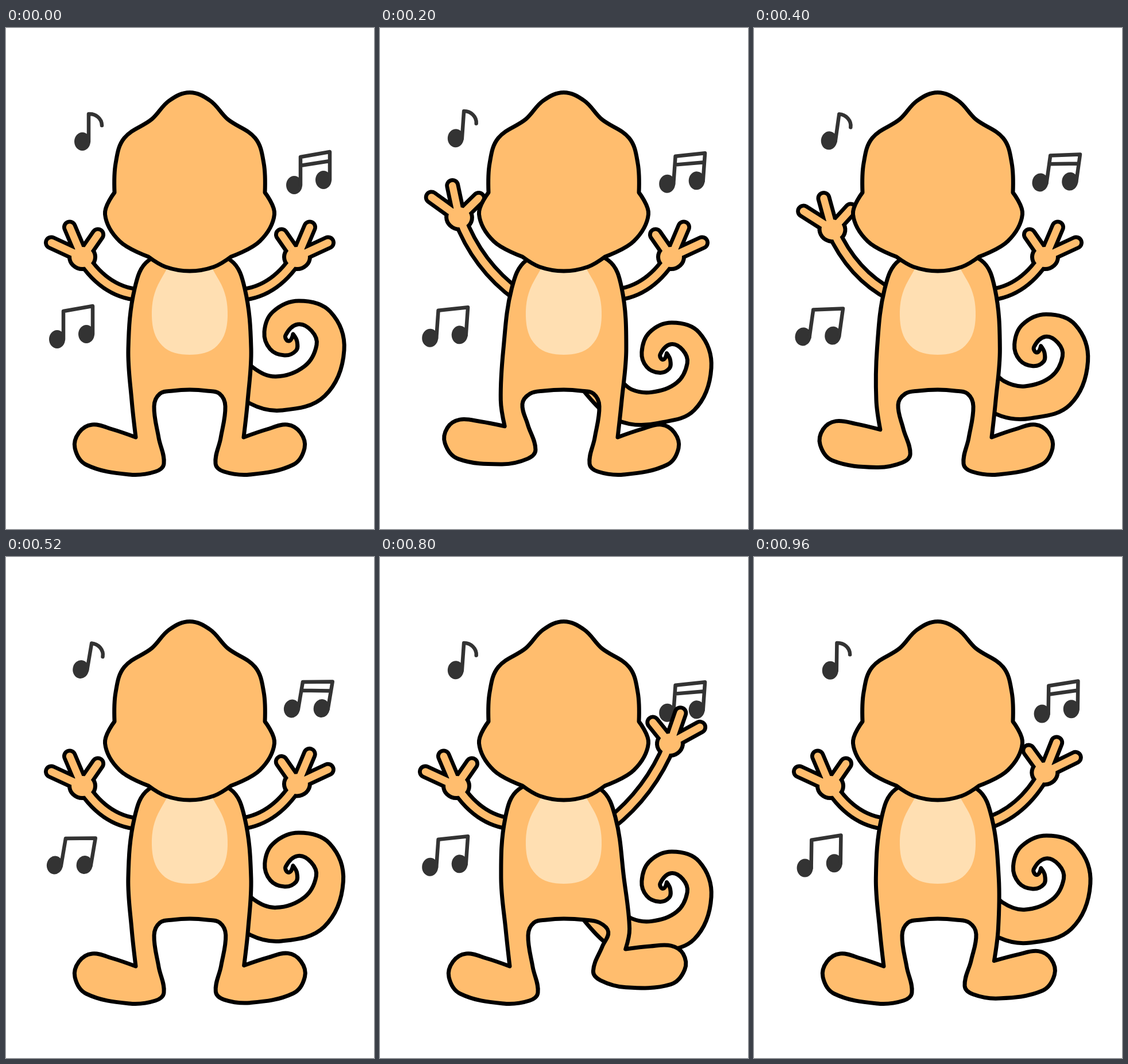
An HTML page with a canvas for the animation above (1 s loop, 641 by 874 pixels).

```html
<!DOCTYPE html>
<html lang="en">
<head>
<meta charset="utf-8">
<title>Dancing lizard</title>
<style>
html, body { margin: 0; width: 100%; height: 100%; overflow: hidden; background: #fff; }
canvas { display: block; }
</style>
</head>
<body>
<canvas id="stage" width="641" height="874"></canvas>
<script>
const ctx = document.getElementById('stage').getContext('2d');
const SKIN = '#ffbd6e', BELLY = '#ffdfb2', INK = '#000', NOTE = '#333';
const MID = 320, CORNER = true;

// Key points of the right halves; the left halves are mirrored
const head = [
  [MID, 112.5], [356, 127], [386, 159], [434, 192], [449, 236], [451, 287, CORNER],
  [467.5, 325], [442, 372], [392, 399, CORNER], [362, 416.7], [MID, 424]
];
const belly = [[MID, 390], [371, 440], [386, 503], [368, 554], [MID, 570]];
const body = [
  [MID, 385], [391, 405], [416, 455], [427, 560], [421, 650], [414, 714, CORNER],
  [455, 700], [490, 692], [513, 706], [520, 733], [500, 762], [425, 779], [380, 774],
  [365, 760], [374, 715], [382, 660], [372, 638], [350, 633], [MID, 631]
];
const tail = [
  [320, 530, CORNER], [375, 612], [425, 655], [480, 667], [555, 642], [589, 562],
  [565, 495], [510, 476], [465, 495], [450, 530], [460, 560], [485, 571], [505, 563],
  [507, 547], [500, 534, CORNER], [493, 546], [487, 536], [508, 517], [532, 528],
  [541, 553], [520, 590], [470, 608], [430, 592], [405, 560, CORNER]
];
const fingers = [[54, -25], [22, -52], [-27, -39]];

const clamp = v => Math.min(1, Math.max(0, v));
const ease = (v, from, to) => { const u = clamp((v - from) / (to - from)); return u * u * (3 - 2 * u); };
const rad = deg => deg * Math.PI / 180;
const flip = ([x, y, corner]) => [2 * MID - x, y, corner];
const join = (right, left) => right.concat(left.map(flip).reverse().slice(1, -1));

// Closed smooth curve: handles run parallel to the neighbours' chord
function trace(pts) {
  const n = pts.length, at = i => pts[(i + n) % n];
  const handle = (i, len) => {
    const [x, y, corner] = at(i), a = at(i - 1), b = at(i + 1);
    const dx = b[0] - a[0], dy = b[1] - a[1], s = corner ? 0 : len / Math.hypot(dx, dy);
    return [x + dx * s, y + dy * s];
  };
  ctx.beginPath();
  ctx.moveTo(pts[0][0], pts[0][1]);
  for (let i = 0; i < n; i++) {
    const p = at(i), q = at(i + 1), len = .36 * Math.hypot(q[0] - p[0], q[1] - p[1]);
    ctx.bezierCurveTo(...handle(i, len), ...handle(i + 1, -len), q[0], q[1]);
  }
  ctx.closePath();
}

function shape(pts) {
  trace(pts);
  ctx.fillStyle = SKIN;
  ctx.fill();
  ctx.strokeStyle = INK;
  ctx.lineWidth = 7;
  ctx.stroke();
}

// The tail sinks and narrows, its root most of all
function drawTail(k) {
  shape(tail.map(([x, y, corner]) => [
    x - .135 * (x - 496) * k,
    y + (40 - .085 * (y - 476) + .42 * Math.max(0, 455 - x)) * k,
    corner
  ]));
}

function drawArm(k, shift, rise, turn) {
  const x = 507 + shift * k, y = 399.5 - rise * k;
  for (const [color, line, grow] of [[INK, 26, 7], [SKIN, 12.5, 0]]) {
    ctx.strokeStyle = ctx.fillStyle = color;
    ctx.lineWidth = line;
    ctx.beginPath();
    ctx.moveTo(x, y);
    ctx.quadraticCurveTo(465 + 6 * k, 465 - 55 * k, 400, 466);
    ctx.stroke();
    ctx.save();
    ctx.translate(x, y);
    ctx.rotate(rad(turn * k));
    ctx.beginPath();
    for (const tip of fingers) {
      ctx.moveTo(0, 0);
      ctx.lineTo(...tip);
    }
    ctx.stroke();
    ctx.beginPath();
    ctx.ellipse(0, 0, 19 + grow, 17.5 + grow, 0, 0, 7);
    ctx.fill();
    ctx.restore();
  }
}

// A raised leg turns about a far point beside the foot, fading out towards the hip
const raiseLeg = k => body.map(([x, y, corner]) => [
  x + .16 * (800 - y) * k * ease(y, 590, 700) * clamp((x - MID) / 40),
  y - .16 * (602 - x) * k * ease(y, 640, 715),
  corner
]);

function drawBody(left, right) {
  const sway = 7 * (left - right);
  shape(join(raiseLeg(right), raiseLeg(.7 * left))
    .map(([x, y, corner]) => [x + sway * clamp((620 - y) / 200), y, corner]));
}

function drawNote(cx, cy, angle, heads, lines) {
  ctx.save();
  ctx.translate(cx, cy);
  ctx.rotate(rad(angle));
  ctx.fillStyle = ctx.strokeStyle = NOTE;
  ctx.lineWidth = 6.5;
  for (const [x, y] of heads) {
    ctx.beginPath();
    ctx.ellipse(x, y, 14, 16, 0, 0, 7);
    ctx.fill();
  }
  ctx.stroke(new Path2D(lines));
  ctx.restore();
}

const hop = (t, at) => clamp(1 - Math.abs(t - at) / 120);
// One up and down over half a loop; skew delays the top
const arc = (t, skew) => Math.sin(Math.PI * clamp(t / 500) ** skew);

function draw(t) {
  ctx.fillStyle = '#fff';
  ctx.fillRect(0, 0, 641, 874);
  ctx.lineJoin = ctx.lineCap = 'round';

  const left = arc(t, 1.1), right = arc(t - 500, 1.3);
  const swing = 10 * (1 - Math.abs(1 - t / 500));
  const heads = [[-31, 27], [20, 18]], beam = 'M-20 27V-22L31-31V18';
  drawNote(144, 181 - 5 * hop(t, 200), swing, [[-11, 17]], 'M0 17V-31C12-32 23-23 23-11');
  drawNote(533, 247 - 4 * hop(t, 520), swing, heads, beam + 'M-20-7L31-15');
  drawNote(120, 516, swing, heads, beam);

  drawTail(arc(t % 500, 1));
  drawArm(right, -2, 74, -4);
  ctx.save();
  ctx.translate(2 * MID, 0);
  ctx.scale(-1, 1);
  drawArm(left, -5.5, 76, -12);
  ctx.restore();

  drawBody(left, right);
  trace(join(belly, belly));
  ctx.fillStyle = BELLY;
  ctx.fill();
  shape(join(head, head));
}

// 25 poses per second
function tick() {
  draw(Math.floor((performance.now() + 2) / 40) * 40 % 1000);
  requestAnimationFrame(tick);
}
tick();
</script>
</body>
</html>
```
